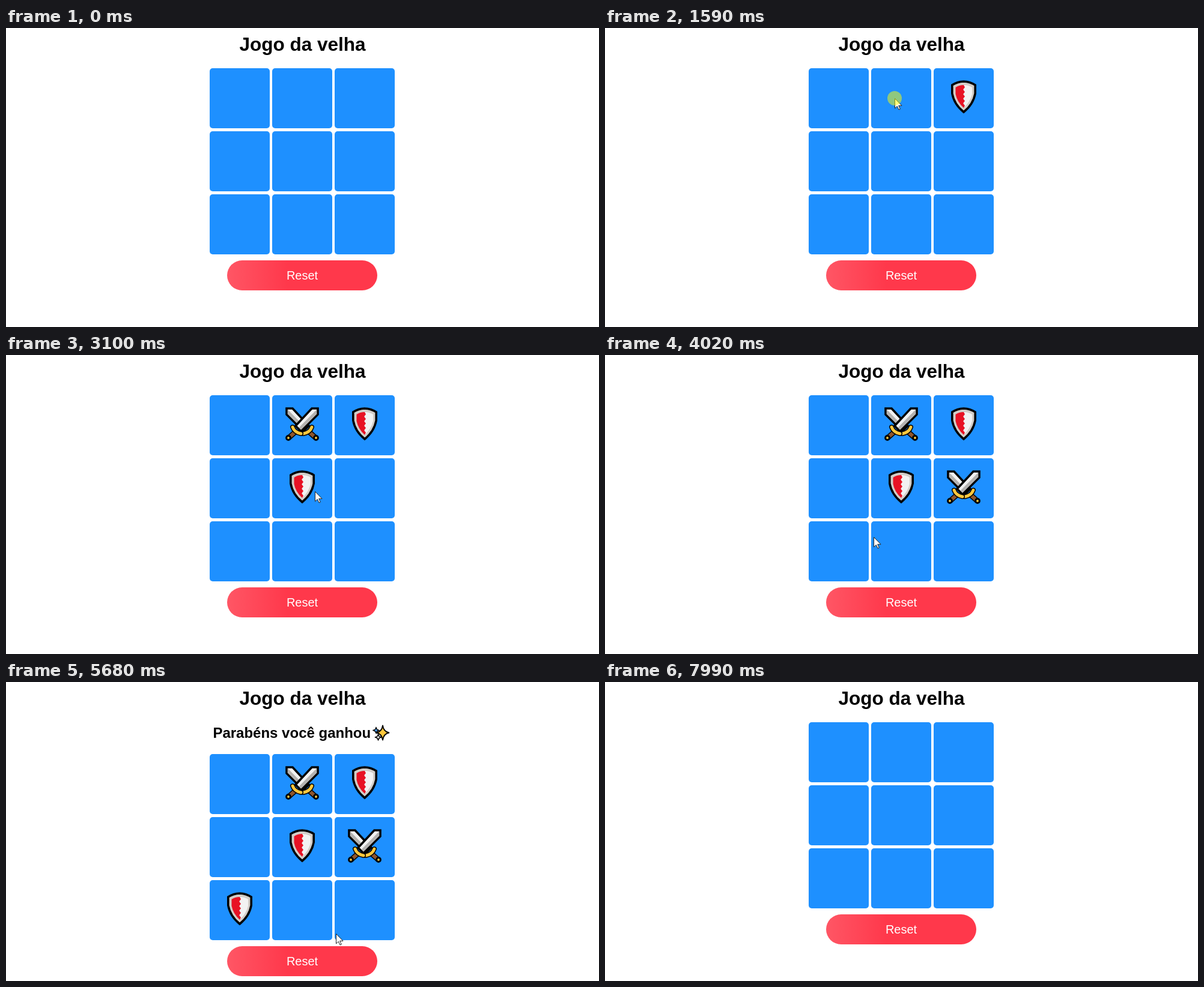
An HTML page that plays this animation: 987x498 px, repeating every 8060 ms.

```html
<!DOCTYPE html>
<html lang="pt">
<head>
<meta charset="utf-8">
<title>Jogo da velha</title>
<style>
  html, body { margin: 0; width: 100%; height: 100%; overflow: hidden; background: #fff; }
  svg { display: block; }
  text { font-family: "Liberation Sans", Arial, sans-serif; }
  .title { font-size: 31.5px; font-weight: bold; text-anchor: middle; }
  .message { font-size: 24px; font-weight: bold; }
  .reset { font-size: 20px; text-anchor: middle; fill: #fff; }
</style>
</head>
<body>
<svg width="987" height="498" viewBox="0 0 987 498">
  <defs>
    <linearGradient id="red">
      <stop offset="0" stop-color="#ff5665"/>
      <stop offset=".4" stop-color="#ff384b"/>
    </linearGradient>

    <g id="shield">
      <path d="M50 22Q61 22.500 69.200 28V42Q66 60 50 73Q34 60 30.800 42V28Q39 22.500 50 22Z"
            fill="#d2cdc8" stroke="#000" stroke-width="3.600"/>
      <path d="M50 28Q58 28 64 32V43Q61 56 50 66Z" fill="#f2f2f2"/>
      <path id="redHalf" fill="#e81224"/>
    </g>

    <g id="sword">
      <path d="M76 22H66L39 51L48 60L76 32Z" fill="#f2f2f2" stroke="#000" stroke-width="3.600"/>
      <path d="M74.200 23.800V31.300L48 57.500L44.500 54Z" fill="#b4b2b0"/>
      <path d="M42 58L28 70.500" stroke="#000" stroke-width="9"/>
      <path d="M42 58L29 69.500" stroke="#8e562e" stroke-width="6"/>
      <circle cx="27" cy="71" r="3.400" fill="#ffc83d" stroke="#000" stroke-width="3"/>
      <g fill="none" stroke-linecap="round">
        <path id="guard" d="M34 53Q37 62 48 64" stroke="#000" stroke-width="8"/>
        <use href="#guard" style="display:none"/>
        <path d="M34 53Q37 62 48 64" stroke="#ffc83d" stroke-width="5"/>
      </g>
    </g>

    <g id="swords">
      <use href="#sword" transform="matrix(-1 0 0 1 100 0)"/>
      <use href="#sword"/>
    </g>

    <path id="star" d="M0-10Q1.500-1.500 10 0Q1.500 1.500 0 10Q-1.500 1.500-10 0Q-1.500-1.500 0-10Z"
          stroke="#000" stroke-linejoin="round"/>
  </defs>

  <text class="title" x="493.500" y="38">Jogo da velha</text>

  <g id="message">
    <text class="message" x="344.400" y="93">Parabéns você ganhou</text>
    <use href="#star" transform="translate(616 80.500) scale(.52)" fill="#4a9ee8" stroke-width="2.600"/>
    <use href="#star" transform="translate(619.500 92) scale(.52)" fill="#d8d8d8" stroke-width="2.600"/>
    <use href="#star" transform="translate(627 84.500) scale(1.050 1.200)" fill="#ffc83d" stroke-width="1.700"/>
  </g>

  <g id="game">
    <g id="board"></g>
    <rect x="368" y="387" width="250" height="50" rx="25" fill="url(#red)"/>
    <text class="reset" x="493" y="419">Reset</text>
    <rect id="focus" x="368" y="387" width="250" height="50" rx="1.500" fill="none" stroke="#101010" stroke-width="2"/>
  </g>

  <g id="pointer">
    <path d="M.5 .5V16.800L4.300 13.300L7 19L9.300 18L6.700 12.300H12Z" fill="#fff" stroke="#222"/>
    <circle id="press" r="12" fill="#ff0" fill-opacity=".5"/>
  </g>
</svg>

<script>
const LOOP = 8060, STEP = 70;
const WIN = 4500, RESET = 6840, BLUR = 7990;

// Pieces alternate between the players: time, cell index
const moves = [[1110, 2], [1660, 1], [3100, 4], [3670, 5], [WIN, 6]];

// Pointer trips: departure, arrival, x, y
const entry = { x: 869, y: 455 };
const trips = [
  [410, 970, 592, 122],
  [1100, 1520, 482, 117],
  [1790, 2560, 606, 240],
  [2620, 2960, 514, 227],
  [3180, 3530, 588, 234],
  [3670, 4230, 399, 327],
  [4630, 5960, 568, 431],
  [6150, 6570, 561, 457],
  [7240, 7660, 406, 137]
];
const pointerStart = trips[0][0], pointerEnd = trips[trips.length - 1][1];
const clicks = [...moves.map(move => move[0]), RESET];

const byId = id => document.getElementById(id);
const [message, game, board, focusRing, pointer, press] =
  ['message', 'game', 'board', 'focus', 'pointer', 'press'].map(byId);

function add(tag, attributes) {
  const node = document.createElementNS('http://www.w3.org/2000/svg', tag);
  for (const [key, value] of Object.entries(attributes)) node.setAttribute(key, value);
  return board.appendChild(node);
}

const cell = i => ({ x: 339 + 104 * (i % 3), y: 67 + 105 * Math.floor(i / 3) });

let teeth = '';
for (let i = 1; i < 10; i++) teeth += `L${i % 2 ? 52 : 49} ${66 - 3.8 * i}`;
byId('redHalf').setAttribute('d', `M50 28Q42 28 36.5 32V43Q39 56 50 66${teeth}Z`);

for (let i = 0; i < 9; i++) add('rect', { ...cell(i), width: 100, height: 100, rx: 5, fill: '#1e90ff' });
const pieces = moves.map(([, index], turn) =>
  add('use', { href: turn % 2 ? '#swords' : '#shield', ...cell(index) }));

const show = (node, visible) => node.setAttribute('visibility', visible ? 'visible' : 'hidden');
const within = (time, start, end) => time >= start && time < end;
const easeOut = k => 1 - (1 - k) ** 1.4;

// Each trip eases out and advances in held steps.
function pointerAt(time) {
  let { x, y } = entry;
  for (const [start, end, toX, toY] of trips) {
    if (time < start) break;
    const held = Math.floor((time - start) / STEP) * STEP;
    const k = time >= end ? 1 : easeOut(held / (end - start));
    x += (toX - x) * k;
    y += (toY - y) * k;
  }
  return [Math.round(x), Math.round(y)];
}

function draw(time) {
  const won = within(time, WIN, RESET);
  show(message, won);
  game.setAttribute('transform', `translate(0 ${won ? 53 : 0})`);
  pieces.forEach((piece, i) => show(piece, within(time, moves[i][0], RESET)));
  show(focusRing, within(time, RESET - STEP, BLUR));
  show(pointer, within(time, pointerStart, pointerEnd));
  show(press, clicks.some(click => within(time, click - STEP, click)));
  pointer.setAttribute('transform', `translate(${pointerAt(time)})`);
}

const start = performance.now();
function tick() {
  draw((performance.now() - start) % LOOP);
  requestAnimationFrame(tick);
}
tick();
</script>
</body>
</html>
```
